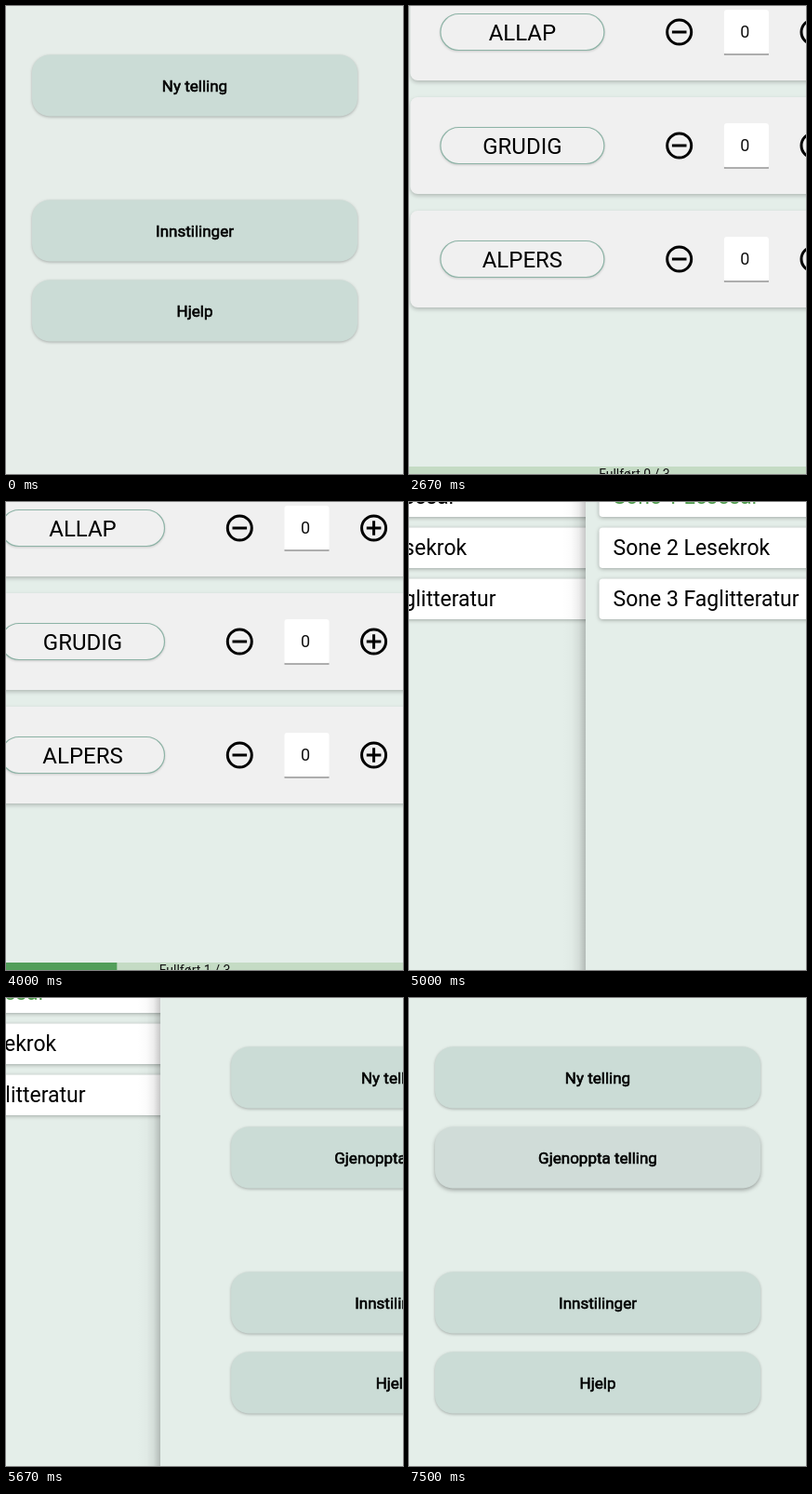
These frames come from a looping animation (427 px wide and 503 px high, 8000 ms). An HTML page:

```html
<!DOCTYPE html>
<html lang="no">
<head>
<meta charset="utf-8">
<title>Telling</title>
<style>
html, body { margin: 0; width: 100%; height: 100%; overflow: hidden; background: #e4eee9; }
svg { display: block; width: 100vw; height: 100vh; font-family: Roboto, Arial, sans-serif; }
.button { fill: #cbdcd6; filter: drop-shadow(0 1.5px 1.5px rgba(0,0,0,.27)); }
.label { font-size: 17px; text-anchor: middle; stroke: #000; stroke-width: .6px; }
.card { fill: #f0f0f0; filter: drop-shadow(0 2.5px 2px rgba(0,0,0,.22)); }
.pill { fill: #f0f0f0; stroke: #8db3a6; stroke-width: 1.2px; filter: drop-shadow(0 1px 1px rgba(0,0,0,.16)); }
.name { font-size: 24px; text-anchor: middle; }
.icon { fill: none; stroke: #000; stroke-width: 3px; }
.value { font-size: 18px; text-anchor: middle; fill: #111; }
.status { font-size: 14px; text-anchor: middle; fill: #111; }
.zone { fill: #fff; filter: drop-shadow(0 1.5px 2px rgba(0,0,0,.3)); }
.title { font-size: 23px; }
</style>
</head>
<body>
<svg id="stage" viewBox="0 0 427 503">
  <defs>
    <linearGradient id="edge" x1="1" x2="0" y1="0" y2="0">
      <stop offset="0" stop-opacity=".22"/>
      <stop offset=".3" stop-opacity=".07"/>
      <stop offset=".6" stop-opacity=".016"/>
      <stop offset="1" stop-opacity="0"/>
    </linearGradient>
  </defs>
</svg>
<script>
const LOOP = 8000;
const LEFT = -48, WIDTH = 502, CENTER = 203;
const SLIDE = 336;
const stage = document.getElementById('stage');

const rect = (x, y, w, h, rx, attrs) =>
  `<rect x="${x}" y="${y}" width="${w}" height="${h}" rx="${rx}" ${attrs}/>`;
const text = (x, y, cls, content, attrs = '') =>
  `<text x="${x}" y="${y}" class="${cls}" ${attrs}>${content}</text>`;

function addPage(content, background = '#e4eee9') {
  const page = document.createElementNS('http://www.w3.org/2000/svg', 'g');
  page.innerHTML = rect(LEFT - 25, 0, 25, 503, 0, 'fill="url(#edge)"') +
    rect(LEFT, 0, WIDTH, 503, 0, `fill="${background}"`) + content;
  stage.append(page);
  return page;
}

const button = ([label, y]) =>
  rect(28, y + .5, 350, 66, 19, 'class="button"') + text(CENTER, y + 40, 'label', label);

const menu = items => items.map(button).join('');

function countRow(name, i) {
  const y = 28 + i * 122;
  const ring = x => `<circle cx="${x}" cy="${y}" r="13" class="icon"/>`;
  return rect(-38, y - 52, 482, 104, 8, 'class="card"') +
    rect(-5.5, y - 19.5, 176, 39, 19.5, 'class="pill"') +
    text(82.5, y + 8.5, 'name', name) +
    ring(251.3) + ring(395.6) +
    `<path class="icon" d="M243.5 ${y}h15.6M387.8 ${y}h15.6M395.6 ${y - 7.8}v15.6"/>` +
    rect(299.5, y - 24, 48, 48, 3, 'fill="#fff"') +
    rect(299.5, y + 23.5, 48, 1, 0, 'fill="#666"') +
    text(322, y + 6.3, 'value', 0);
}

function zoneList(firstColor) {
  return ['Lesesal', 'Lesekrok', 'Faglitteratur'].map((name, i) => {
    const y = -28 + i * 55;
    return rect(-33.5, y + .5, 473, 43.5, 4, 'class="zone"') +
      text(-18.5, y + 30, 'title', `Sone ${i + 1} ${name}`, `fill="${i ? '#000' : firstColor}"`);
  }).join('');
}

const zones = addPage(zoneList('#000'));
const counting = addPage(
  ['ALLAP', 'GRUDIG', 'ALPERS'].map(countRow).join('') +
  rect(LEFT, 495, WIDTH, 8, 0, 'fill="#c4dbc4"') +
  rect(LEFT, 495, 0, 8, 0, 'id="bar" fill="#529e5a"') +
  text(CENTER, 508, 'status', '', 'id="status"'));
const updatedZones = addPage(zoneList('#529e50'));
const startMenu = addPage(
  menu([['Ny telling', 52], ['Innstilinger', 208], ['Hjelp', 294]]), '#e6ede9');
const resumeMenu = addPage(
  menu([['Ny telling', 52], ['Gjenoppta telling', 138], ['Innstilinger', 294], ['Hjelp', 380]]));

const bar = document.getElementById('bar');
const status = document.getElementById('status');
const resumeButton = resumeMenu.querySelectorAll('.button')[1];

const ramp = (t, from, to) => Math.min(1, Math.max(0, (t - from) / (to - from)));

// cubic-bezier(.35, .91, .33, .97)
function ease(x) {
  const bezier = (u, a, b) => 3 * a * u * (1 - u) ** 2 + 3 * b * u * u * (1 - u) + u ** 3;
  let low = 0, high = 1;
  for (let i = 0; i < 24; i++) {
    const mid = (low + high) / 2;
    if (bezier(mid, .35, .33) < x) low = mid; else high = mid;
  }
  return bezier(high, .91, .97);
}

const slide = (t, start) => ease(ramp(t, start, start + SLIDE));

function place(page, visible, x = 0) {
  page.setAttribute('display', visible ? 'inline' : 'none');
  page.setAttribute('transform', `translate(${x.toFixed(2)} 0)`);
}

function render(t) {
  const enter = slide(t, 2502);
  const leave = slide(t, 4485);
  const refresh = slide(t, 4932);
  const home = slide(t, 5595);

  place(startMenu, t < 2670);
  place(counting, t >= 2670 && leave < 1, WIDTH * (1 - enter + leave));
  place(zones, leave > 0 && refresh < 1, -WIDTH / 3 * (1 - leave + refresh));
  place(updatedZones, refresh > 0 && home < 1, WIDTH * (1 - refresh - home / 3));
  place(resumeMenu, home > 0, WIDTH * (1 - home));

  bar.setAttribute('width', WIDTH / 3 * ramp(t, 3900, 4000));
  status.textContent = `Fullført ${t < 3930 ? 0 : 1} / 3`;

  const hover = ramp(t, 5800, 5930);
  const mix = (a, b) => Math.round(a + (b - a) * hover);
  resumeButton.style.fill = `rgb(${mix(203, 208)},${mix(220, 220)},${mix(214, 216)})`;
  resumeButton.style.filter =
    `drop-shadow(0 ${1.5 + hover * .5}px ${1.5 + hover * .5}px rgba(0,0,0,${.27 + hover * .05}))`;
}

const begin = performance.now();
function tick() {
  render((performance.now() - begin) % LOOP);
  requestAnimationFrame(tick);
}
tick();
</script>
</body>
</html>
```
